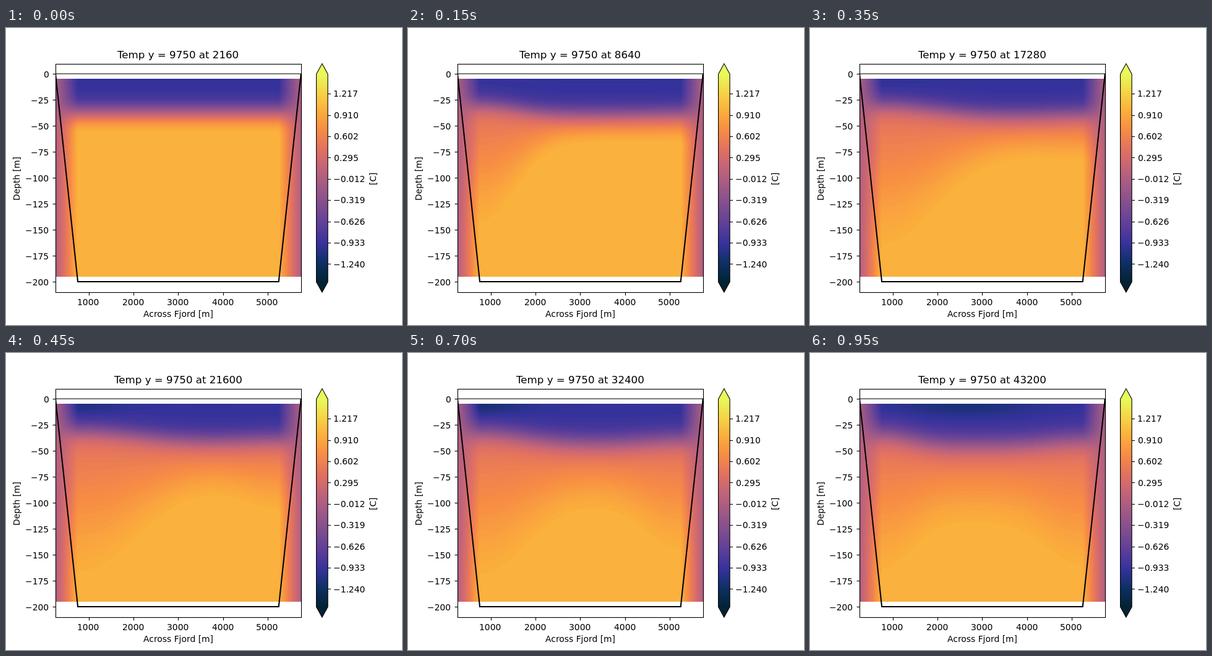
An HTML page with a canvas that plays this animation: 640x480 px, repeating every 1 s.

```html
<!DOCTYPE html>
<html lang="en">
<head>
<meta charset="utf-8">
<title>Fjord temperature section</title>
<style>
  html, body { margin: 0; width: 100%; height: 100%; overflow: hidden; background: #fff; }
  canvas { display: block; }
</style>
</head>
<body>
<canvas id="stage" width="640" height="480"></canvas>
<script>
const ctx = document.getElementById('stage').getContext('2d');
const FONT = '"DejaVu Sans", Verdana, sans-serif';
const STEPS = 20, STEP_MS = 50;
const BAND = 0.03071, FIRST = -1.2402; // contour interval and lowest labelled level

// Thermal colour scale, evenly spaced from -1.5 to 1.5 degrees
const SCALE = [
  [3, 35, 51], [13, 48, 100], [53, 50, 155], [93, 62, 153],
  [126, 77, 143], [158, 89, 135], [193, 100, 121], [225, 113, 97],
  [246, 139, 69], [251, 173, 60], [246, 211, 70], [231, 250, 90]
];
const rgb = c => `rgb(${c})`;
const clamp = v => Math.max(0, Math.min(1, v));
const smooth = v => (v = clamp(v), v * v * (3 - 2 * v));
const bump = (v, width) => Math.exp(-((v / width) ** 2));
const px = m => 80 + (m - 250) * 396.8 / 5500;
const py = m => 74.4 - m * 1.68;
const barY = v => 242.4 - v * 112;
const snap = v => Math.floor(v + 0.5) + 0.5;

function color(v) {
  const mid = FIRST + (Math.floor((v - FIRST) / BAND) + 0.5) * BAND;
  const p = clamp((mid + 1.5) / 3) * 11, n = Math.min(10, Math.floor(p));
  return SCALE[n].map((c, j) => c + (SCALE[n + 1][j] - c) * (p - n));
}

// Returns the temperature profile over depth at one place and time:
// a cold layer, a sharp transition, then a slow rise to 1 degree.
function profile(x, step) {
  const t = step / (STEPS - 1);
  const inflow = 1 - Math.exp(-step / 1.6);
  const left = bump(x - 750, 900 + 900 * Math.sin(Math.PI * t) ** 2);
  const right = bump(x - 5250, 1100);
  const mid = 34 + 10 * Math.sqrt(t) - 10 * inflow * left - 5 * t * right;
  const width = 10 + 4 * t;
  const deep = 57 + 73 * t + 110 * inflow * (1 - t * t / 2) * left
    + 50 * smooth((t - 0.3) / 0.35) * right;
  const chill = 0.3 * bump(step - 12, 3.5) * bump(x - 750, 1000)
    + 0.18 * bump(step - 19, 1.5) * bump(x - 2600, 1500);
  return z => {
    const top = -0.97 - chill * bump(z - 5, 12);
    const warm = 0.5 + 0.5 * Math.tanh((z - mid) / width);
    return top + (0.5 - top) * warm + 0.5 * smooth((z - mid) / (deep - mid));
  };
}

const W = 397, H = 320;
const field = ctx.createImageData(W, H);

function drawField(step) {
  for (let i = 0; i < W; i++) {
    const x = 250 + (i + 0.5) * 5500 / 396.8;
    const at = profile(Math.min(5250, Math.max(750, x)), step);
    // Temperature falls to zero at both banks
    const bank = clamp(Math.min(x - 250, 5750 - x) / 500);
    for (let j = 0; j < H; j++) {
      const z = Math.max(5, (j + 8.1) / 1.68);
      field.data.set([...color(at(z) * bank), 255], (j * W + i) * 4);
    }
  }
  ctx.putImageData(field, 80, 82);
}

function path(points, color, width, close) {
  ctx.beginPath();
  points.forEach(p => ctx.lineTo(...p));
  if (close) ctx.closePath();
  ctx.strokeStyle = color;
  ctx.lineWidth = width;
  ctx.stroke();
}

// Text on whole pixels; align is 0 for left, 0.5 for centre, 1 for right
function text(s, x, y, align = 0.5, size = 13.89, angle = 0) {
  ctx.save();
  ctx.font = `${size}px ${FONT}`;
  ctx.fillStyle = '#000';
  const m = ctx.measureText(s);
  const bearing = Math.max(0, Math.floor(-m.actualBoundingBoxLeft));
  const shift = -m.width * align;
  if (angle) {
    ctx.translate(x, y);
    ctx.rotate(angle);
    ctx.fillText(s, Math.round(shift) - bearing, 0);
  } else {
    ctx.fillText(s, Math.round(x + shift) - bearing, Math.round(y));
  }
  ctx.restore();
}

const minus = s => String(s).replace('-', '\u2212');
const tick = (x1, y1, x2, y2) => path([[x1, y1], [x2, y2]], '#000', 1.11);

function drawAxes() {
  ctx.save();
  ctx.beginPath();
  ctx.rect(80, 57.6, 397, 369.6);
  ctx.clip();
  path([[80, 74], [477, 74]], '#777b75', 2);
  path([[250, 0], [750, -200], [5250, -200], [5750, 0]]
    .map(([x, y]) => [px(x), Math.round(py(y))]), '#000', 2.08);
  ctx.restore();
  ctx.lineWidth = 1.11;
  ctx.strokeStyle = '#000';
  ctx.strokeRect(80.5, 58.5, 397, 369);

  for (let m = 1000; m <= 5000; m += 1000) {
    const x = snap(px(m));
    tick(x, 427.5, x, 432.4);
    text(m, px(m), 448);
  }
  for (let m = 0; m >= -200; m -= 25) {
    const y = snap(py(m));
    tick(75.6, y, 80.5, y);
    text(minus(m), 70.3, py(m) + 5.3, 1);
  }
  text('Across Fjord [m]', 278.4, 467);
  text('Depth [m]', 22, 242, 0.5, 13.89, -Math.PI / 2);
}

function drawBar() {
  const l = 501.6, r = 520.1, mid = (l + r) / 2, top = barY(1.5), low = barY(-1.5);
  const shape = [[l, top], [mid, 57.6], [r, top], [r, low], [mid, 427.2], [l, low]];
  const fill = ctx.createLinearGradient(0, low, 0, top);
  SCALE.forEach((c, i) => fill.addColorStop(i / 11, rgb(c)));
  ctx.beginPath();
  shape.forEach(p => ctx.lineTo(...p));
  ctx.fillStyle = fill;
  ctx.fill();
  path(shape, '#000', 1.11, true);
  for (let i = 0; i < 9; i++) {
    const v = FIRST + i * 10 * BAND, y = snap(barY(v));
    tick(520, y, 525, y);
    text(minus(v.toFixed(3)), 529.8, barY(v) + 5.3, 0);
  }
  text('[C]', 598, 243, 0.5, 13.89, -Math.PI / 2);
}

function draw(step) {
  ctx.fillStyle = '#fff';
  ctx.fillRect(0, 0, 640, 480);
  drawField(step);
  drawAxes();
  drawBar();
  text(`Temp y = 9750 at ${2160 * (step + 1)}`, 278.4, 49, 0.5, 16.67);
}

let shown = -1;
const begin = performance.now();
function frame() {
  const step = Math.floor((performance.now() - begin) / STEP_MS) % STEPS;
  if (step !== shown) draw(shown = step);
  requestAnimationFrame(frame);
}
frame();
</script>
</body>
</html>
```
